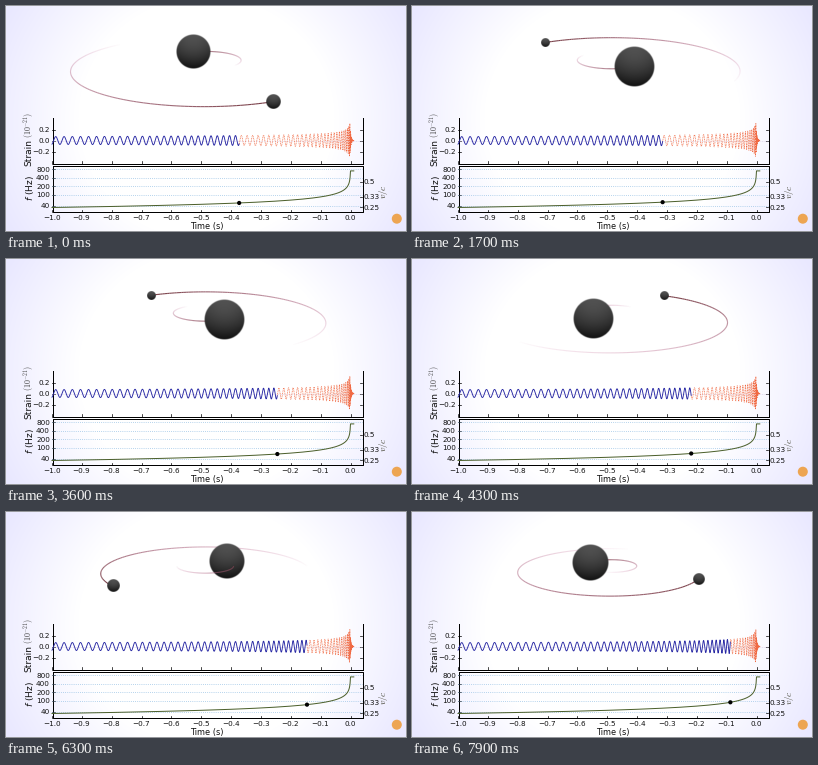
Recreate the animation shown at these times as a matplotlib script. Size 400 by 225 pixels, loop 8000 ms.

```python
import numpy as np
import matplotlib.pyplot as plt
from matplotlib.animation import FuncAnimation
from matplotlib.collections import LineCollection

W, H, DPI = 400, 225, 100
FRAMES, STEP = 80, 100
plt.rcParams.update({"font.family": "DejaVu Sans", "mathtext.fontset": "dejavusans"})

# Simulated time at a few frames; playback speed varies slightly
KEYS = [0, 17, 26, 36, 50, 63, 79]
TIMES = [-.373, -.3145, -.2819, -.2451, -.1924, -.1458, -.0876]

SMALL_CENTRE, BIG_CENTRE = (199, 56), (199.5, 53.6)
CAMERA, TILT = 444, np.radians(14.5)
MASS_RATIO = .275
TRAIL = .0168


def px(size):
    return size * 72 / DPI


def orbit_angle(t):
    return np.radians(-66.8 + 10200 * (.5399 - np.maximum(-t, 0) ** .625))


def project(t, ratio, centre):
    """Screen x, y, depth towards the viewer and perspective scale."""
    a = 164 * np.maximum(-t, 0) ** .25 * ratio
    th = orbit_angle(t)
    x, depth = a * np.cos(th), -a * np.sin(th)
    s = CAMERA / (CAMERA - depth * np.cos(TILT))
    return centre[0] + x * s, centre[1] + depth * np.sin(TILT) * s, depth, s


def tx(t):
    return 344.5 + 298.5 * np.asarray(t)


def strain_y(h):
    return 134.5 - 55 * np.asarray(h)


def freq_y(f):
    return 200 - 8.5 * np.log2(np.asarray(f) / 40)


fig = plt.figure(figsize=(W / DPI, H / DPI), dpi=DPI, facecolor="white")
ax = fig.add_axes([0, 0, 1, 1])
ax.axis("off")

# Soft vignette
gy, gx = np.mgrid[0:H, 0:W]
edge = np.clip((np.hypot(gx - 200, (gy - 112) * 1.05) - 128) / 100, 0, 1)[..., None]
ax.imshow(1 - edge * (1 - np.array([.915, .91, 1])), extent=(0, W, H, 0),
          aspect="auto", zorder=0)


def line(x, y, color="black", lw=1, **kw):
    return ax.plot(x, y, color=color, lw=px(lw), **kw)[0]


def label(x, y, s, size=7.3, ha="center", **kw):
    kw.setdefault("color", "#111111")
    va = "center" if "rotation" in kw else "center_baseline"
    ax.text(x, y, s, fontsize=px(size), ha=ha, va=va, **kw)


# Axes frames
line([46.5, 46.5], [112, 157.5])
line([356.5, 356.5], [112, 157.5])
line([46.5, 356.5], [157.5, 157.5])
line([46.5, 356.5, 356.5, 46.5, 46.5], [159.5, 159.5, 206, 206, 159.5])

for i in range(11):
    t = -1 + i / 10
    x = tx(t)
    line([x, x], [206, 203.5], lw=.7)
    line([x, x], [157.5, 155], lw=.7)
    label(x - .3, 211.5, f"{t:.1f}".replace("-0.0", "0.0").replace("-", "\u2212"))

for h in (.2, 0, -.2):
    y = strain_y(h)
    line([46, 48.5], [y, y], lw=.7)
    line([353.5, 356], [y, y], lw=.7)
    label(44, y, f"{h:.1f}".replace("-", "\u2212"), ha="right")
line([46, 356], strain_y([0, 0]), "#c8b8dc", .6, ls=":")

for f in (40, 100, 200, 400, 800):
    y = freq_y(f)
    line([46, 48.5], [y, y], lw=.7)
    line([46, 356], [y, y], "#94c0e4", .8, ls=":")
    label(44, y, str(f), ha="right")

for v, y in (("0.5", 175.5), ("0.33", 190.7), ("0.25", 201)):
    line([353.5, 356], [y, y], lw=.7)
    label(358, y, v, ha="left")

label(201, 219.2, "Time (s)", 8.3)
label(23, 146.5, "Strain", 9, rotation=90)
label(23, 118.5, r"$(10^{-21})$", 8, rotation=90, color="#444444",
      math_fontfamily="cm")
label(23.5, 182, r"$f$ (Hz)", 9, rotation=90)
label(378, 185.5, r"$v/c$", 9, rotation=90, color="#444433", math_fontfamily="cm")

ax.add_patch(plt.Circle((390.8, 212.7), 5, fc="#eda552", ec="none"))

# Signal curves
ts = np.linspace(-1, .012, 7000)
tau = np.maximum(-ts, 3.5e-4)
ring = np.exp(-np.maximum(ts + .002, 0) / .003)
amp = np.minimum(.071 * tau ** -.25, .31) * ring
phase = 2 * orbit_angle(ts) + np.where(ts > 0, 2 * np.pi * 690 * ts, 0)
wave_x, wave_y = tx(ts), strain_y(amp * np.cos(phase))
line(wave_x[ts < .011], freq_y(35.4 * tau ** -.375)[ts < .011], "#4c602c")

future = line([], [], "#f06a44", .75, ls=(0, (1.2, 1.0)), zorder=2)
past = line([], [], "#2828a4", .9, zorder=3)
dot = ax.add_patch(plt.Circle((0, 0), 2.1, fc="black", ec="none", zorder=5))


def make_ball():
    v, u = np.mgrid[-1:1:96j, -1:1:96j]
    r = np.hypot(u, v)
    grey = np.clip(.25 - .06 * r ** 2 - .13 * v, .05, 1)
    alpha = np.clip((1 - r) * 24, 0, 1)
    return ax.imshow(np.dstack([grey, grey, grey, alpha]), extent=(0, 1, 1, 0),
                     aspect="auto", interpolation="bilinear")


def place(ball, x, y, r, z):
    ball.set_extent((x - r, x + r, y + r, y - r))
    ball.set_zorder(z)


big, small = make_ball(), make_ball()
trails = []
for ratio, centre in ((1, SMALL_CENTRE), (-MASS_RATIO, BIG_CENTRE)):
    pair = [ax.add_collection(LineCollection([], linewidths=px(1.1), zorder=z))
            for z in (1, 4)]
    trails.append((ratio, centre, pair))

FADE = np.linspace(1, 0, 120)
NEAR, FAR = np.array([.45, .22, .25]), np.array([.86, .52, .70])
RGBA = np.column_stack([FADE[:, None] * NEAR + (1 - FADE[:, None]) * FAR, FADE ** .8])

ax.set_xlim(0, W)
ax.set_ylim(H, 0)


def update(n):
    now = np.interp(n, KEYS, TIMES)

    k = np.searchsorted(ts, now)
    past.set_data(wave_x[:k], wave_y[:k])
    future.set_data(wave_x[k:], wave_y[k:])
    dot.center = tx(now), freq_y(35.4 * (-now) ** -.375)

    bx, by, b_depth, bs = project(now, -MASS_RATIO, BIG_CENTRE)
    sx, sy, s_depth, ss = project(now, 1, SMALL_CENTRE)
    place(big, bx, by, 18.7 * bs ** 1.35, 3)
    place(small, sx, sy, 5.3 * ss, 5 if s_depth > b_depth else 2)

    # Trail parts nearer than the big ball are drawn over it
    t = now - np.linspace(0, TRAIL, 121)
    for ratio, centre, (back, front) in trails:
        x, y, depth, _ = project(t, ratio, centre)
        pts = np.column_stack([x, y])
        segs = np.stack([pts[:-1], pts[1:]], axis=1)
        over = depth[:-1] > b_depth + 19
        for coll, mask in ((back, ~over), (front, over)):
            coll.set_segments(segs[mask])
            coll.set_color(RGBA[mask])
    return []


anim = FuncAnimation(fig, update, frames=FRAMES, interval=STEP,
                     repeat=True, repeat_delay=0, blit=False)
plt.show()
```
